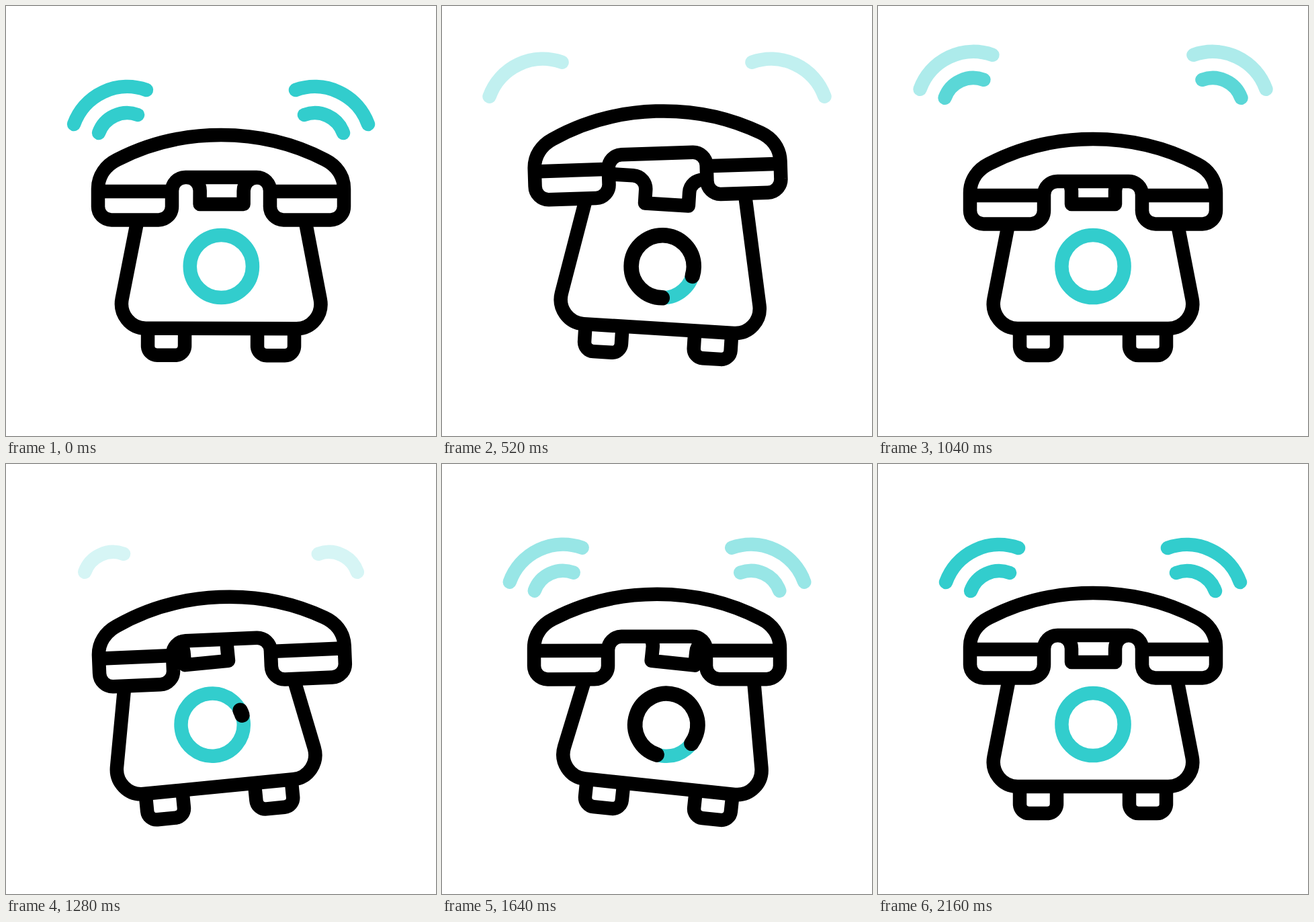
Write an HTML page that moves like this. It is 640 by 640 pixels and loops after 2200 ms.

```html
<!DOCTYPE html>
<html lang="en">
<head>
<meta charset="utf-8">
<title>Ringing phone</title>
<style>
  html, body { margin: 0; height: 100%; overflow: hidden; background: #fff; }
  svg { display: block; width: 100vw; height: 100vh; }
  path, circle { fill: none; stroke: #000; stroke-width: 20.5; stroke-linejoin: round; }
  .fill { fill: #fff; }
  .teal { stroke: #32cdcd; }
  .wave path { stroke: #32cdcd; stroke-linecap: round; }
  #arc { stroke-width: 22.5; stroke-linecap: round; }
</style>
</head>
<body>
<svg viewBox="0 0 640 640">
  <defs>
    <path id="foot" d="M211 482V506A14 14 0 0 0 225 520H252A14 14 0 0 0 266 506V482"/>
    <g id="wave" class="wave">
      <path class="outer" d="M101 176A84.5 84.5 0 0 1 209 125"/>
      <path class="inner" d="M138 189A45 45 0 0 1 196 162"/>
    </g>
  </defs>
  <g id="left"><use href="#wave"/></g>
  <g id="right"><use href="#wave" transform="translate(640 0) scale(-1 1)"/></g>
  <g id="body">
    <path d="M288 275V295H353V275A20 20 0 0 1 373 255H414A20 20 0 0 1 434 271L467.5 436C472 459 455 480 432 480H208C185 480 168 459 172.500 436L206 271A20 20 0 0 1 226 255H268A20 20 0 0 1 288 275Z" id="shell"/>
    <use href="#foot"/>
    <use href="#foot" transform="translate(640 0) scale(-1 1)"/>
    <circle class="teal" cx="320" cy="387.500" r="46.600"/>
    <circle id="arc" cx="320" cy="387.500" r="46.600" pathLength="360"/>
  </g>
  <g id="handset">
    <path class="fill" d="M137 272C137 252 149 237 165 229C213 204 265 192 320 192S427 204 475 229C491 237 503 252 503 272V298A20 20 0 0 1 483 318.500H413A20 20 0 0 1 393 298V275A20 20 0 0 0 373 255H267A20 20 0 0 0 247 275V298A20 20 0 0 1 227 318.500H157A20 20 0 0 1 137 298Z"/>
    <path d="M137 276H247M393 276H503"/>
  </g>
</svg>
<script>
const LOOP = 2200, CYCLE = 1080;
const $ = id => document.getElementById(id);
const clamp = x => Math.min(1, Math.max(0, x));
const linear = x => x;
const smooth = x => x * x * (3 - 2 * x);
const cubic = x => x < .5 ? 4 * x ** 3 : 1 - 4 * (1 - x) ** 3;

// Straight sides that follow the slope visible below the handset.
$('shell').setAttribute('d',
  'M288 275V295H353V275A20 20 0 0 1 373 255H416A20 20 0 0 1 435.500 271' +
  'L467.500 436C472 459 455 480 432 480H208C185 480 168 459 172.500 436' +
  'L204.500 271A20 20 0 0 1 224 255H268A20 20 0 0 1 288 275Z');

// Value at time t along [time, value] keys.
function track(keys, t, ease = smooth) {
  let [t0, v0] = keys[0];
  for (const [t1, v1] of keys) {
    if (t < t1) return v0 + (v1 - v0) * ease((t - t0) / (t1 - t0));
    [t0, v0] = [t1, v1];
  }
  return v0;
}

const spread = [[0, 0], [840, 1], [1680, 0]];
const fade = {
  outer: [[0, 1], [340, 0], [400, 0], [800, 1], [1200, 0], [1480, 0], [1800, 1]],
  inner: [[0, 1], [360, 0], [560, 0], [960, 1], [1360, 0], [1480, 0], [1800, 1]]
};
const lift = [[0, 0], [640, -39], [1040, 6], [1360, 6], [1800, 0]];
const tilt = [[0, 0], [330, -6], [760, 4], [1040, 0], [1080, 0], [1440, -4.1], [1810, 3.1], [2140, 0]];

function draw(t) {
  const s = track(spread, t);
  $('left').setAttribute('transform', `translate(${-45 * s} ${-61 * s})`);
  $('right').setAttribute('transform', `translate(${45 * s} ${-61 * s})`);
  for (const name in fade)
    document.querySelector('.' + name).style.opacity = track(fade[name], t, linear);

  const c = t < CYCLE ? t : t - CYCLE;
  const shake = c < 992 ? 6 * Math.sin(c / 248 * 2 * Math.PI) : 0;
  $('body').setAttribute('transform', `rotate(${shake} 320 520)`);

  const sweep = mid => 290 * cubic(clamp((c - mid) / 480 + .5));
  const start = sweep(753), length = sweep(345) - start;
  const arc = $('arc');
  arc.style.visibility = length > .5 ? 'visible' : 'hidden';
  arc.setAttribute('stroke-dasharray', `${length} 400`);
  arc.setAttribute('transform', `rotate(${c / 1060 * 360 + start - 90} 320 387.5)`);

  $('handset').setAttribute('transform',
    `translate(0 ${track(lift, t)}) rotate(${track(tilt, t)} 320 252)`);
}

const begin = performance.now();
function tick() {
  draw((performance.now() - begin) % LOOP);
  requestAnimationFrame(tick);
}
tick();
</script>
</body>
</html>
```
